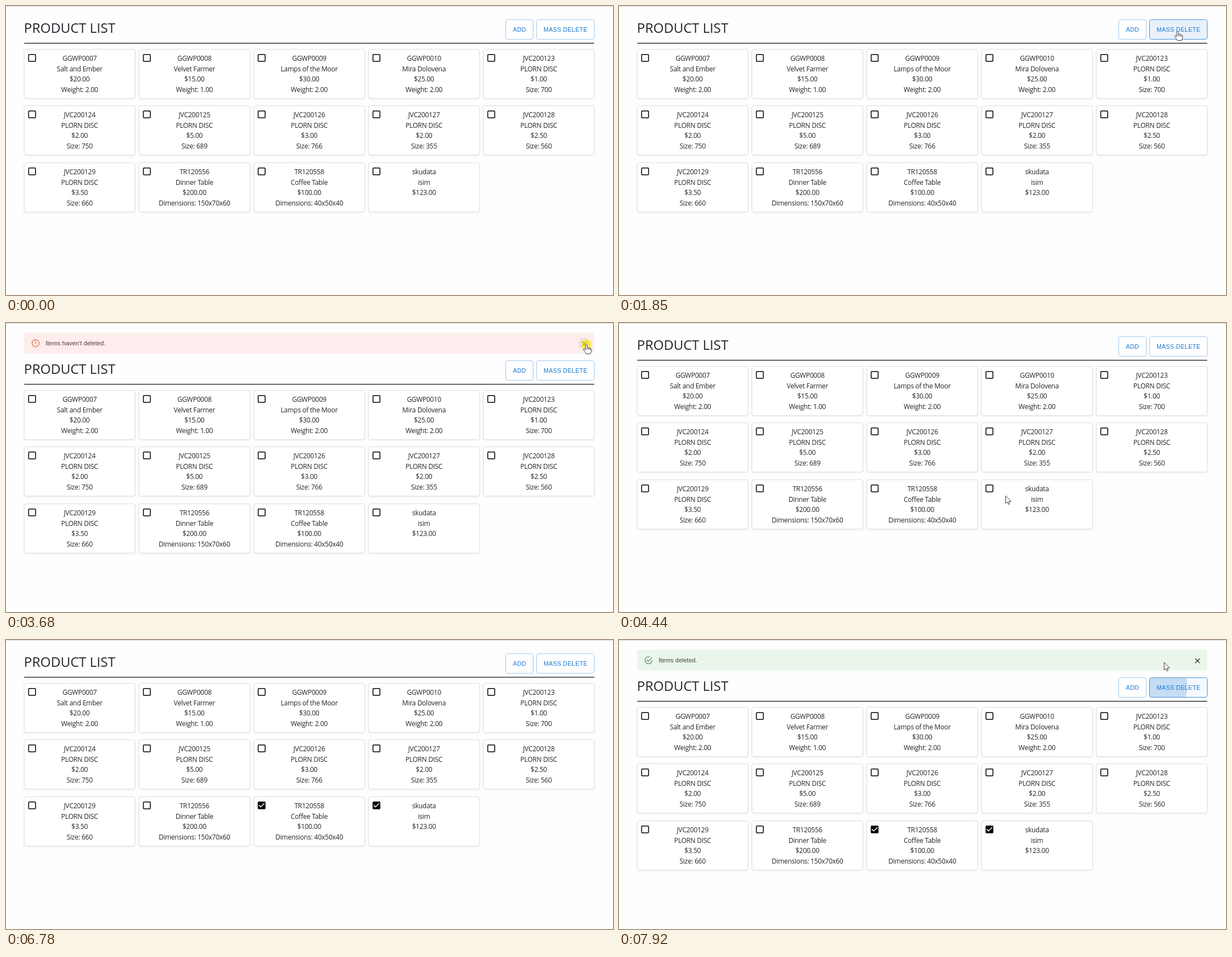
An HTML page that plays this animation: 1084x517 px, repeating every 7.99 s.

```html
<!DOCTYPE html>
<html lang="en">
<head>
<meta charset="utf-8">
<title>Product list</title>
<style>
html, body { margin: 0; width: 100%; height: 100%; overflow: hidden; background: #fefefe; }
svg { display: block; width: 1084px; height: 517px; }
.body { font: 12px "Open Sans", "Noto Sans", sans-serif; letter-spacing: -.26px; fill: #212529; text-anchor: middle; }
.title { font: 500 24px "Open Sans", "Noto Sans", sans-serif; fill: #212529; }
.btn { font: 10.73px "Liberation Sans", Arial, sans-serif; letter-spacing: .306px; fill: #1976d2; text-anchor: middle; }
.msg { font: 10.73px "Liberation Sans", Arial, sans-serif; letter-spacing: .115px; }
.card { fill: #fff; stroke: #dedfdf; filter: drop-shadow(0 1.5px 1.5px rgba(0, 0, 0, .075)); }
.box { stroke: #000; stroke-width: 1.53; }
.tick { fill: none; stroke: #fff; stroke-width: 1.53; }
.cursor { fill: #fff; stroke: #2b2b2b; stroke-width: .9; stroke-linejoin: round; }
#icon { fill: none; stroke-width: 1.4; }
#close { stroke-width: 1.3; }
#glow { fill: #fff000; opacity: .62; }
</style>
</head>
<body>
<svg viewBox="0 0 1084 517">
  <defs><clipPath id="clip"><rect x="948" y="25" width="102" height="34" rx="2.5"/></clipPath></defs>
  <rect width="1084" height="517" fill="#fefefe"/>
  <rect width="1084" height="1" fill="#d4d4d4"/>
  <g id="alert">
    <rect id="panel" x="32.5" y="17.5" width="1018" height="37" rx="3"/>
    <path id="icon"/>
    <text id="msg" class="msg" x="70.7" y="39.9"></text>
    <circle id="halo" cx="1033" cy="37.3" r="10.7" opacity=".06"/>
    <path id="close" d="M1028.9 33.2l8.2 8.2m0-8.2l-8.2 8.2"/>
  </g>
  <g id="page">
    <text class="title" x="32" y="48.2">PRODUCT LIST</text>
    <rect x="892.5" y="24.5" width="49" height="35" rx="3" fill="#fff" stroke="#a3c8ed"/>
    <text class="btn" x="917" y="45.6">ADD</text>
    <rect id="button" x="947.5" y="24.5" width="103" height="35" rx="3"/>
    <g clip-path="url(#clip)"><circle id="ripple" fill="#1976d2"/></g>
    <text class="btn" x="999.2" y="45.6">MASS DELETE</text>
    <rect x="32.5" y="65.9" width="1018" height="1.4" fill="#212529"/>
    <g id="cards"></g>
  </g>
  <circle id="glow" r="9.5"/>
  <path id="arrow" class="cursor" d="M0 0V13.8L3.2 10.9 5.2 15.6 7.3 14.7 5.3 10.1H9.8Z"/>
  <path id="hand" class="cursor" d="M-1.6 1.3C-1.6-.7 1.4-.7 1.4 1.3V6C1.8 4.8 4 5 4.1 6.4 4.8 5.4 6.6 5.8 6.6 7.2 7.4 6.4 8.8 7 8.8 8.3V11.5C8.8 13.2 7.6 14 7.4 16.6H-.6C-.8 14.8-3.6 12-5 9.6-5.8 8-4 7-2.9 8.2L-1.6 9.8ZM1.4 6v3.4M4.1 6.4v3.2M6.6 7.2v2.6"/>
</svg>
<script>
const LOOP = 7990;
const $ = id => document.getElementById(id);
const set = (el, attrs) => { for (const k in attrs) el.setAttribute(k, attrs[k]); };
const show = (el, on) => el.setAttribute('visibility', on ? 'inherit' : 'hidden');
const clamp = x => Math.min(1, Math.max(0, x));
const easeOut = x => 1 - (1 - clamp(x)) ** 1.6;

const items = `GGWP0007|Salt and Ember|$20.00|Weight: 2.00
GGWP0008|Velvet Farmer|$15.00|Weight: 1.00
GGWP0009|Lamps of the Moor|$30.00|Weight: 2.00
GGWP0010|Mira Dolovena|$25.00|Weight: 2.00
JVC200123|PLORN DISC|$1.00|Size: 700
JVC200124|PLORN DISC|$2.00|Size: 750
JVC200125|PLORN DISC|$5.00|Size: 689
JVC200126|PLORN DISC|$3.00|Size: 766
JVC200127|PLORN DISC|$2.00|Size: 355
JVC200128|PLORN DISC|$2.50|Size: 560
JVC200129|PLORN DISC|$3.50|Size: 660
TR120556|Dinner Table|$200.00|Dimensions: 150x70x60
TR120558|Coffee Table|$100.00|Dimensions: 40x50x40
skudata|isim|$123.00`.split('\n').map(row => row.split('|'));

const cardAt = i => [32.5 + i % 5 * 205, 77.5 + Math.round(Math.floor(i / 5) * 101.3)];

$('cards').innerHTML = items.map((lines, i) => `<g transform="translate(${cardAt(i)})">
  <rect class="card" width="198" height="88" rx="3.5"/>
  <rect class="box" x="7.9" y="9.3" width="12.3" height="12.3" rx="1"/>
  <path class="tick" d="M9.2 14.9l3.3 3.3 6.3-6.4"/>
  ${lines.map((s, k) => `<text class="body" x="99" y="${20.7 + k * 18.45}">${s}</text>`).join('')}</g>`).join('');
const boxes = document.querySelectorAll('.box'), ticks = document.querySelectorAll('.tick');

const alerts = [
  { from: 1910, to: 3810, text: "Items haven't deleted.", bg: '#fdeded', ink: '#4f3433', tone: '#e07b4c', cross: '#4a1f1f',
    icon: 'M59.2 36.3a6.3 6.3 0 1 1-12.6 0a6.3 6.3 0 1 1 12.6 0zM52.9 32.8V37m0 1.4v1.4' },
  { from: 7850, to: LOOP, text: 'Items deleted.', bg: '#eaf6ea', ink: '#34453a', tone: '#6c8a62', cross: '#1c2a1d',
    icon: 'M59.2 36.3A6.3 6.3 0 1 1 54.8 30.2M49.6 35.5l2.6 2.7 6.6-6.6' }
];
const alertAt = t => alerts.find(a => t >= a.from && t < a.to);
const shiftAt = t => alertAt(t) ? 43 : 0;

// each glide starts where the last one ended unless it enters from an edge
const glides = [
  { at: 520, end: 640, from: [942, 366], to: [950, 359] },
  { at: 780, end: 1000, to: [1084, 98] },
  { at: 1180, end: 1450, from: [1012, 6], to: [997.5, 45] },
  { at: 2690, end: 2990, to: [1034.5, 41] },
  { at: 3410, end: 3540, to: [1036.5, 38.5] },
  { at: 3810, end: 4440, to: [690.5, 309] },
  { at: 4510, end: 5250, to: [665.5, 298] },
  { at: 5460, end: 6180, to: [457, 291] },
  { at: 6640, end: 6770, to: [1084, 70] },
  { at: 7110, end: 7460, from: [986, 0], to: [973.5, 40] }
];
const clicks = [1580, 3680, 5390, 6250, 7730];

function pointer(t) {
  let pos = [1084, 0];
  for (const g of glides) {
    if (t < g.at) break;
    const from = g.from || pos, f = easeOut((t - g.at) / (g.end - g.at));
    pos = from.map((v, k) => v + (g.to[k] - v) * f);
  }
  return pos;
}

// what lies under the pointer: 'delete', 'close', a checkbox index or null
function hit(t) {
  const [x, y] = pointer(t), shift = shiftAt(t);
  if (x > 947 && x < 1051 && y > 24 + shift && y < 60 + shift) return 'delete';
  if (shift && Math.hypot(x - 1033, y - 37.3) < 10.7) return 'close';
  const i = items.findIndex((_, k) => {
    const [cx, cy] = cardAt(k);
    return Math.hypot(x - cx - 14, y - cy - 15.5 - shift) < 11;
  });
  return i < 0 ? null : i;
}

const ripples = clicks.filter(c => hit(c) === 'delete');

function draw(t) {
  const a = alertAt(t), target = hit(t);
  show($('alert'), a);
  if (a) {
    set($('panel'), { fill: a.bg });
    set($('icon'), { d: a.icon, stroke: a.tone });
    set($('msg'), { fill: a.ink });
    set($('close'), { stroke: a.cross });
    $('msg').textContent = a.text;
  }
  show($('halo'), a && target === 'close');
  set($('page'), { transform: `translate(0 ${shiftAt(t)})` });

  const hover = target === 'delete' || hit(t - 150) === 'delete';
  set($('button'), { fill: hover ? '#f5f9fd' : '#fff', stroke: hover ? '#4a92db' : '#a3c8ed' });

  const press = ripples.find(c => t >= c && t < c + 300);
  show($('ripple'), press);
  if (press) {
    const [cx, cy] = pointer(press), age = t - press;
    set($('ripple'), { cx, cy, r: 85 * easeOut(age / 550), opacity: .22 * (1 - clamp((age - 190) / 110)) });
  }

  const checked = clicks.filter(c => t >= c + 70).map(hit);
  boxes.forEach((box, i) => {
    const on = checked.includes(i);
    set(box, { fill: on ? '#000' : '#fff' });
    show(ticks[i], on);
  });

  const pos = pointer(t), visible = pos[0] < 1084;
  show($('arrow'), visible && target === null);
  show($('hand'), visible && target !== null);
  show($('glow'), clicks.some(c => t >= c && t < c + 100));
  for (const id of ['arrow', 'hand', 'glow']) set($(id), { transform: `translate(${pos})` });
}

const start = performance.now();
function tick() {
  draw((performance.now() - start) % LOOP);
  requestAnimationFrame(tick);
}
tick();
</script>
</body>
</html>
```
